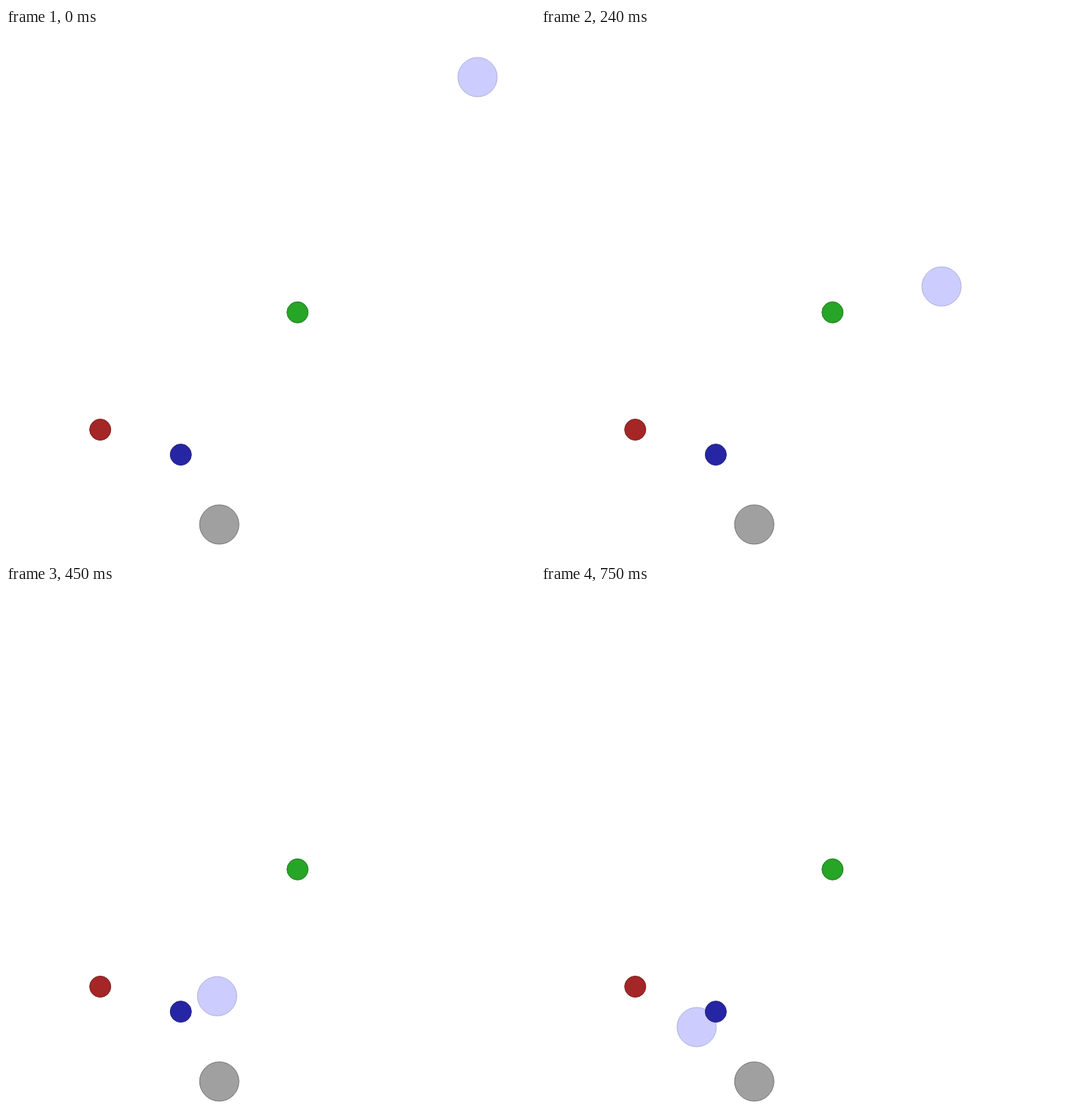
Recreate the animation shown at these times as an HTML page with a canvas. Size 700 by 700 pixels, loop 0.78 s.

```html
<!DOCTYPE html>
<html lang="en">
<head>
<meta charset="utf-8">
<title>Moving disc</title>
<style>
  html, body { margin: 0; width: 100%; height: 100%; overflow: hidden; background: #fff; }
  canvas { display: block; }
</style>
</head>
<body>
<canvas width="700" height="700"></canvas>
<script>
const ctx = document.querySelector('canvas').getContext('2d');
const STEP_MS = 30, STEPS = 26, ARRIVAL = 17;
const knots = [0, 4, 8, 13, ARRIVAL];
const pathX = [624, 606.5, 530, 353, 223.5];
const pathY = [65, 184, 342, 499, 585];

// Lagrange polynomial through the knots
const curve = (values, k) => values.reduce((sum, value, i) =>
  sum + knots.reduce((p, knot, j) =>
    j === i ? p : p * (k - knot) / (knots[i] - knot), value), 0);

// A smooth approach, then a jitter that settles sideways
function position(k) {
  if (k <= ARRIVAL) return [curve(pathX, k), curve(pathY, k)];
  return [204.3 + 19.2 * 0.738 ** (k - ARRIVAL), k % 2 ? 585 : 595];
}

function disc(x, y, r, fill, stroke) {
  ctx.beginPath();
  ctx.arc(x, y, r, 0, 2 * Math.PI);
  ctx.fillStyle = fill;
  ctx.fill();
  ctx.strokeStyle = stroke;
  ctx.stroke();
}

function draw(now) {
  const k = Math.floor(now / STEP_MS) % STEPS;
  ctx.clearRect(0, 0, 700, 700);
  disc(282.2, 657, 26, '#a0a0a0', '#757575');
  disc(...position(k), 26, '#ccccff', '#b0b0e0');
  disc(124.7, 531.5, 14, '#a52626', '#7a2020');
  disc(385.8, 376.3, 14, '#26a526', '#207a20');
  disc(231.3, 564.6, 14, '#2626a5', '#20207a');
}

const start = performance.now();
function tick() {
  draw(performance.now() - start);
  requestAnimationFrame(tick);
}
tick();
</script>
</body>
</html>
```
